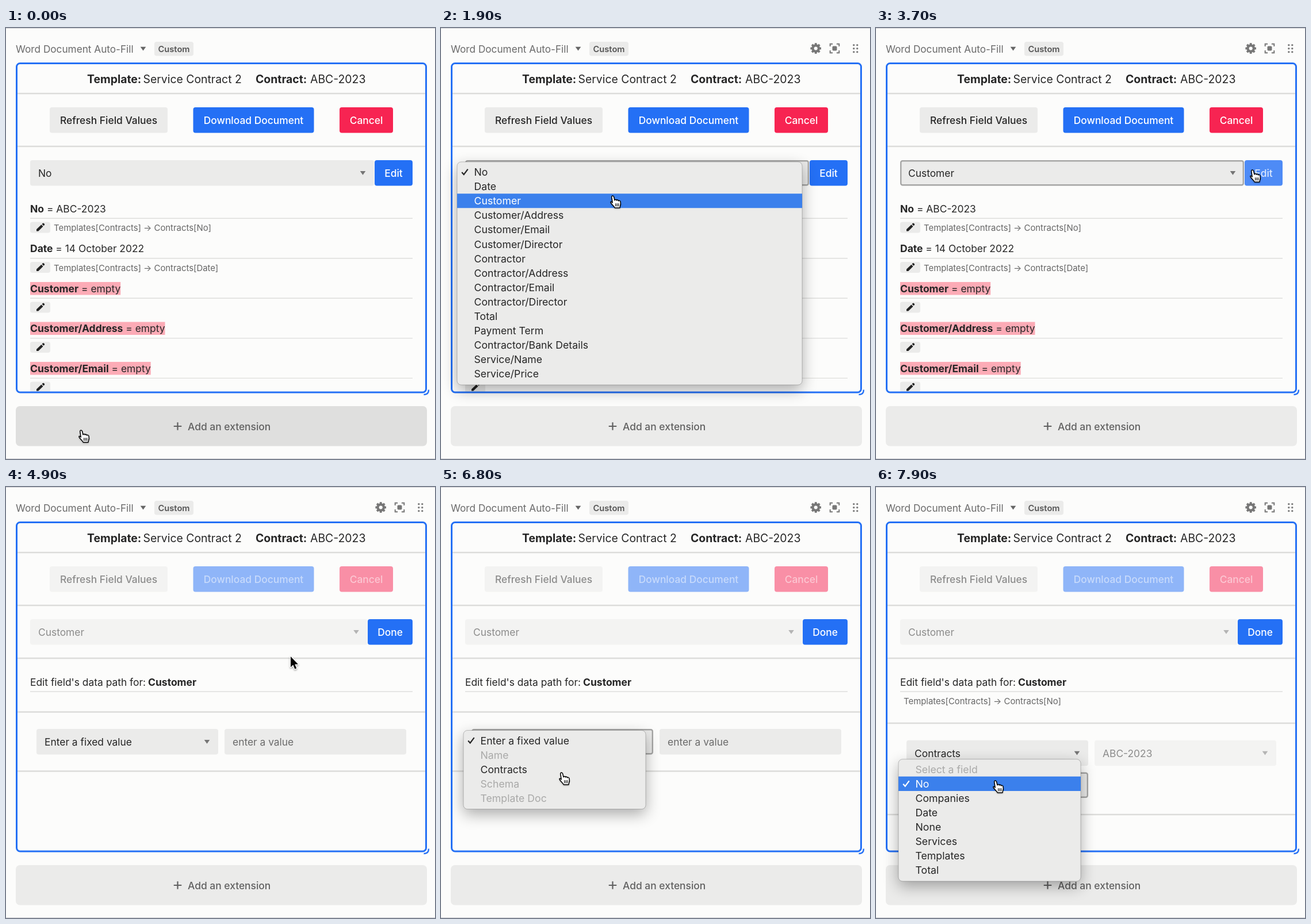
Write an HTML page with a canvas that moves like this. It is 746x750 px and loops after 8000 ms.

```html
<!DOCTYPE html>
<html lang="en">
<head>
<meta charset="utf-8">
<title>Field editor</title>
<style>
html, body { margin: 0; width: 100%; height: 100%; overflow: hidden; background: #fcfcfb; }
canvas { display: block; }
</style>
</head>
<body>
<canvas id="stage" width="746" height="750"></canvas>
<script>
const ctx = document.getElementById('stage').getContext('2d');
const LOOP = 8000, STEP = 100, ROW = 25.1;
const BG = '#fcfcfb', INK = '#262626', GRAY = '#ebebea', BLUE = '#2470f5', RED = '#f72452', RULE = '#dcdcda';

const HAND = new Path2D('M4.2 13 L2.8 3.4 C2.4 .4 5.9 .1 6.6 3 L8 8.8 C8.3 7 11 7 11.4 9 C11.8 7.6 14.4 7.9 14.7 10 C15.2 8.7 17.7 9.2 18.1 11.6 C18.7 14.5 18.8 16.2 17.5 18.8 L17 22 H8.3 C7.3 19.5 4.6 17.8 1.8 14 C-.2 11 1.8 10 4.2 13Z');
const FINGERS = new Path2D('M9.7 14.5V19 M12.2 14.5V19 M14.7 14.5V19');
const ARROW = new Path2D('M0 0V18.5L4.3 14.6L7.3 21.8L10.2 20.6L7.2 13.6H13Z');
const PENCIL = new Path2D('M-7 6.6V3.5L1.4 -4.5L4.6 -1.5L-3.7 6.6Z M2.5 -5.5L4 -7Q4.9 -7.6 5.8 -6.9L7 -5.7Q7.6 -4.9 6.9 -4.1L5.5 -2.6Z');
const CHECK = new Path2D('M-5.3 .4L-1.8 4.3L5.2 -5');

// Cursor stops: time, x, y
const STOPS = [
  [0, 126, 699], [100, 126, 699], [1000, 290, 245], [1400, 290, 245], [1900, 294, 291],
  [2500, 292.5, 296.5], [2700, 292.5, 296.5], [3500, 650, 246], [4100, 650, 246],
  [4900, 494, 295], [5500, 200, 436], [5800, 200, 436], [6300, 204, 490], [6700, 205, 496],
  [7000, 205, 496], [7400, 203, 510], [8000, 203, 510]
];
const ARROW_TIMES = [[300, 800], [2700, 2900], [4300, 5200], [7100, 7200]];

const FIELDS = [
  ['No', 'ABC-2023'], ['Date', '14 October 2022'], ['Customer'], ['Customer/Address'], ['Customer/Email']
];
const MENUS = [
  { x: 28, y: 233, w: 600, open: 1400, close: 2400, fade: 250, blink: 2300, checked: 0, off: [],
    items: ['No', 'Date', 'Customer', 'Customer/Address', 'Customer/Email', 'Customer/Director',
      'Contractor', 'Contractor/Address', 'Contractor/Email', 'Contractor/Director', 'Total',
      'Payment Term', 'Contractor/Bank Details', 'Service/Name', 'Service/Price'] },
  { x: 39, y: 423.5, w: 317, open: 5800, close: 6900, fade: 250, blink: 6800, checked: 0, off: [1, 3, 4],
    items: ['Enter a fixed value', 'Name', 'Contracts', 'Schema', 'Template Doc'] },
  { x: 39, y: 473.7, w: 317, open: 7600, close: LOOP, fade: 250, blink: -1, checked: 1, off: [0],
    items: ['Select a field', 'No', 'Companies', 'Date', 'None', 'Services', 'Templates', 'Total'] }
];

let tip;

function cursorAt(t) {
  const i = Math.max(1, STOPS.findIndex(s => s[0] > t));
  const [a, b] = [STOPS[i - 1], STOPS[i]];
  const u = (t - a[0]) / (b[0] - a[0]), e = u * u * (3 - 2 * u);
  return { x: a[1] + (b[1] - a[1]) * e, y: a[2] + (b[2] - a[2]) * e };
}

function withAlpha(alpha, draw) {
  ctx.save();
  ctx.globalAlpha *= alpha;
  draw();
  ctx.restore();
}

function at(x, y, draw) {
  ctx.save();
  ctx.translate(x, y);
  draw();
  ctx.restore();
}

// Text with its capitals centred on cy; returns its width
function text(s, x, cy, { size = 17.4, weight = 400, color = INK, align = 'left' } = {}) {
  ctx.font = `${weight} ${size}px Inter, sans-serif`;
  ctx.textAlign = align;
  ctx.fillStyle = color;
  ctx.fillText(s, x, cy + size * 0.363);
  return ctx.measureText(s).width;
}

function box(x, y, w, h, color, r = 4) {
  ctx.fillStyle = color;
  ctx.beginPath();
  ctx.roundRect(x, y, w, h, r);
  ctx.fill();
}

function outline(x, y, w, h, color, width, r) {
  ctx.strokeStyle = color;
  ctx.lineWidth = width;
  ctx.beginPath();
  ctx.roundRect(x, y, w, h, r);
  ctx.stroke();
}

function strokePath(path, color, width) {
  ctx.strokeStyle = color;
  ctx.lineWidth = width;
  ctx.stroke(path);
}

function fillPath(path, color) {
  ctx.fillStyle = color;
  ctx.fill(path);
}

function triangle(x, y, color = '#757575') {
  at(x, y, () => fillPath(new Path2D('M-4.8 -3.2H4.8L0 3.5Z'), color));
}

function divider(y) { box(20, y - 1.2, 709, 2.4, RULE, 0); }
function underline(y) { box(42, y - 0.7, 665, 1.4, '#dededc', 0); }

function button(label, x, y, w, fill, color = '#fff') {
  const hot = tip.x > x && tip.x < x + w && tip.y > y && tip.y < y + 44.5;
  withAlpha(hot ? 0.8 : 1, () => {
    box(x, y, w, 44.5, fill);
    text(label, x + w / 2, y + 23, { weight: 550, color, align: 'center' });
  });
}

function select(label, x, y, w, focus) {
  box(x, y, w, 44.5, GRAY);
  if (focus) outline(x + 1.2, y + 1.2, w - 2.4, 42, '#a6a6a5', 2.4, 3);
  text(label, x + 14, y + 23);
  triangle(x + w - 19.5, y + 22.3);
}

function gear() {
  ctx.strokeStyle = ctx.fillStyle = '#777';
  ctx.lineWidth = 4.2;
  ctx.beginPath();
  ctx.arc(0, 0, 5.2, 0, 7);
  ctx.stroke();
  for (let i = 0; i < 8; i++) {
    ctx.fillRect(-1.9, -9.3, 3.8, 3.6);
    ctx.rotate(Math.PI / 4);
  }
}

function headerIcons() {
  at(651.7, 35.5, gear);
  at(684.5, 35.5, () => {
    strokePath(new Path2D('M-7.8 -3.4V-7.8H-3.4 M3.4 -7.8H7.8V-3.4 M7.8 3.4V7.8H3.4 M-3.4 7.8H-7.8V3.4'), '#777', 2);
    box(-4, -4, 8, 8, '#777', 2);
  });
  for (let i = 0; i < 6; i++) box(716.3 + (i % 2) * 6, 28.3 + (i >> 1) * 6, 3, 3, '#777', 1);
}

function frame(hover) {
  ctx.fillStyle = BG;
  ctx.fillRect(0, 0, 746, 750);
  box(0, 0, 746, 1, '#cfcfd3', 0);
  box(0, 749, 746, 1, '#cfcfd3', 0);
  text('Word Document Auto-Fill', 17, 36.5, { size: 17.2, color: '#6a6a6a' });
  triangle(238.5, 36, '#666');
  box(258, 24, 68, 24.5, GRAY);
  text('Custom', 292, 36.7, { size: 14.7, weight: 600, color: '#555', align: 'center' });
  if (hover) headerIcons();

  box(17, 658, 715, 69.5, hover ? GRAY : '#dfdfde', 7);
  at(298.5, 693, () => strokePath(new Path2D('M-6.8 0H6.8M0 -6.8V6.8'), '#616161', 2.2));
  text('Add an extension', 316, 694, { weight: 500, color: '#616161' });
}

function heading(dim) {
  const size = 19.4;
  text('Template:', 141, 88.5, { size, weight: 700 });
  text('Service Contract 2', 238.5, 88.5, { size });
  text('Contract:', 434, 88.5, { size, weight: 700 });
  text('ABC-2023', 529, 88.5, { size });
  divider(114);
  withAlpha(dim ? 0.5 : 1, () => {
    button('Refresh Field Values', 76, 138, 205, GRAY, INK);
    button('Download Document', 325.5, 138, 210, BLUE);
    button('Cancel', 580, 138, 93, RED);
  });
  divider(206);
}

function path(name, x, cy) {
  text(`Templates[Contracts] -> Contracts[${name}]`, x, cy, { size: 14.9, color: '#666' });
}

function fieldRow([name, value], i) {
  const y = 314.4 + i * 69.55, bold = { size: 17.5, weight: 700 };
  const rest = ` = ${value || 'empty'}`;
  if (!value) {
    ctx.font = '700 17.5px Inter, sans-serif';
    let w = ctx.measureText(name).width;
    ctx.font = '400 17.4px Inter, sans-serif';
    w += ctx.measureText(rest).width;
    box(42, y - 11.5, w, 22.5, '#fcabb6', 0);
  }
  const w = text(name, 42, y, bold);
  text(rest, 42 + w, y);
  underline(y + 16.8);
  box(42, y + 23, 35, 19, GRAY);
  at(60, y + 32.4, () => fillPath(PENCIL, '#222'));
  if (value) path(name, 83, y + 33.3);
}

function listView(t) {
  heading(false);
  select(t < 2700 ? 'No' : 'Customer', 42, 230, 598, t >= 1300);
  button('Edit', 641, 230, 66, BLUE);
  FIELDS.forEach(fieldRow);
}

function editView(t) {
  const linked = t >= 7100, y = linked ? 440.7 : 421;
  heading(true);
  withAlpha(0.5, () => select('Customer', 42, 230, 586.5));
  button('Done', 629, 230, 78, BLUE);
  divider(298);
  text("Edit field's data path for:", 42, 340);
  text('Customer', 247, 340, { size: 17.5, weight: 700 });
  underline(356);
  if (linked) path('No', 48, 373);
  divider(linked ? 411 : 391.5);
  select(linked ? 'Contracts' : 'Enter a fixed value', 53, y, 316, t >= 5700 && t < 7500);
  if (linked) {
    withAlpha(0.5, () => select('ABC-2023', 380, y, 316));
    select('No', 53, 496.5, 316, t >= 7500);
  } else {
    box(380, y, 316, 44.5, GRAY);
    text('enter a value', 394, y + 23, { color: '#6b6b6b' });
  }
  divider(linked ? 570 : 494.5);
}

function menu(m, t) {
  const alpha = Math.min(1, 1 - (t - m.close) / m.fade);
  if (t < m.open || alpha <= 0) return;
  const h = m.items.length * ROW + 11.5, top = m.y + 5;
  const hot = t === m.blink ? -1 : Math.floor((tip.y - top) / ROW);
  withAlpha(alpha, () => {
    ctx.save();
    ctx.shadowColor = 'rgba(0,0,0,.32)';
    ctx.shadowBlur = 26;
    ctx.shadowOffsetY = 9;
    box(m.x, m.y, m.w, h, '#ebebea', 7);
    ctx.restore();
    outline(m.x, m.y, m.w, h, 'rgba(0,0,0,.22)', 1, 7);
    m.items.forEach((item, i) => {
      const off = m.off.includes(i), lit = i === hot && !off, y = top + i * ROW;
      const color = lit ? '#fff' : off ? '#a9a9a8' : INK;
      if (lit) box(m.x, y, m.w, ROW, '#3b80ec', 0);
      text(item, m.x + 29.5, y + 12.6, { size: 17.7, color });
      if (i === m.checked) at(m.x + 13.5, y + 12.6, () => strokePath(CHECK, color, 2.2));
    });
  });
}

function cursor(p, t) {
  const arrow = ARROW_TIMES.some(([a, b]) => t >= a && t < b);
  ctx.save();
  ctx.translate(p.x + (arrow ? 1 : 0), p.y);
  ctx.lineJoin = ctx.lineCap = 'round';
  ctx.shadowColor = 'rgba(0,0,0,.35)';
  ctx.shadowBlur = 3;
  ctx.shadowOffsetY = 1.5;
  if (arrow) {
    strokePath(ARROW, '#fff', 2.6);
    ctx.shadowColor = 'transparent';
    fillPath(ARROW, '#000');
  } else {
    fillPath(HAND, '#fff');
    ctx.shadowColor = 'transparent';
    strokePath(HAND, '#000', 1.5);
    strokePath(FINGERS, '#000', 1.1);
  }
  ctx.restore();
}

function draw(t) {
  const p = cursorAt(t);
  tip = { x: p.x + 4.5, y: p.y + 1 };
  frame(p.y < 650);

  ctx.save();
  ctx.beginPath();
  ctx.rect(18, 62, 713, 571);
  ctx.clip();
  t < 4200 ? listView(t) : editView(t);
  ctx.restore();

  outline(18.5, 61.5, 712, 572.5, BLUE, 3, 6);
  strokePath(new Path2D('M735 629.5Q735 638 726.5 638'), BLUE, 2.4);
  MENUS.forEach(m => menu(m, t));
  cursor(p, t);
}

function tick() {
  const t = performance.now() % LOOP;
  draw(Math.floor(t / STEP) * STEP);
  requestAnimationFrame(tick);
}
tick();
</script>
</body>
</html>
```
